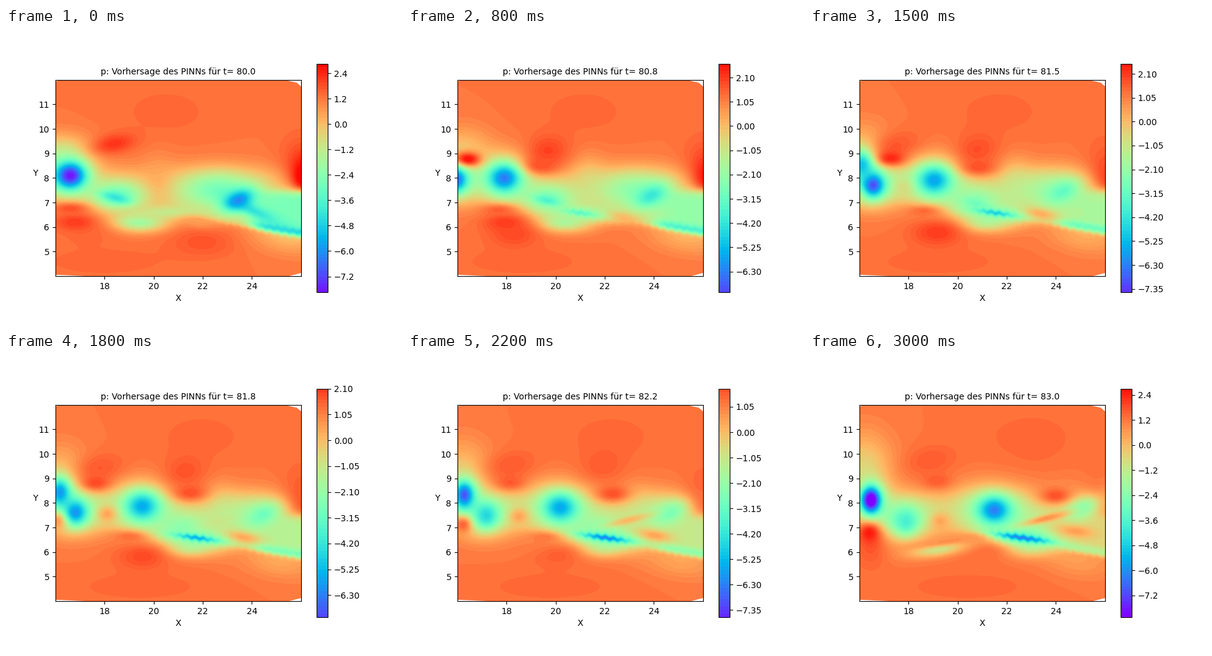
Animation, 640 px wide and 480 px high, one loop 3100 ms. Source, as a matplotlib script:

```python
import numpy as np
import matplotlib.pyplot as plt
from matplotlib.animation import FuncAnimation

FRAMES, INTERVAL = 31, 100
STEP = 0.15                       # spacing of the contour levels
VMIN, VMAX = -8.17, 2.93
XLIM, YLIM = (16.0005, 25.9995), (4.0005, 11.9995)
X, Y = np.meshgrid(np.linspace(*XLIM, 200), np.linspace(*YLIM, 160))

# Range of the prediction over time
KEY_U = [0, 0.8, 1.2, 1.8, 2.2, 2.6, 3]
KEY_LOW = [-7.95, -7.2, -7.65, -7.2, -7.65, -7.95, -8.25]
KEY_HIGH = [2.85, 2.7, 3.0, 2.1, 1.8, 1.8, 2.7]

# Corners outside the hull of the data
CORNERS = [
    [(16, 12), (16.2, 12), (16, 11.93)],
    [(25.3, 12), (25.83, 11.88), (26, 11.73), (26, 12)],
    [(16, 4), (16, 4.06), (17.3, 4)],
    [(25.5, 4), (26, 4.13), (26, 4)],
]


def sigmoid(s):
    return 0.5 * (1 + np.tanh(s / 2))


def rise(u, start, length=0.5):
    """Smooth ramp from 0 to 1."""
    s = np.clip((u - start) / length, 0, 1)
    return s * s * (3 - 2 * s)


def pulse(u, middle, width):
    return np.exp(-((u - middle) / width) ** 2)


class Pressure:
    """Pressure at time u: structures that drift with the flow."""

    def __init__(self, u):
        self.p = np.full(X.shape, 1.2)
        self.edge = 6.35 + 0.07 * u - 0.17 * (X - 21.8)
        self.edge += 0.02 * np.sin(2 * np.pi * X / 0.32) * sigmoid((X - 22) / 0.3)
        for part in (self.background, self.wake, self.halos, self.crests,
                     self.outflow, self.cores, self.streaks):
            part(u)

    def blend(self, weight, value):
        self.p += weight * (value - self.p)

    def spot(self, x, y, sx, sy, value, tilt=0, weight=1, ripple=0):
        """Pull the field towards a value inside a soft ellipse."""
        c, s = np.cos(np.radians(tilt)), np.sin(np.radians(tilt))
        dx = X - x
        dy = Y - y + ripple * np.sin(2 * np.pi * X / 0.33)
        q = ((dx * c + dy * s) / sx) ** 2 + ((dy * c - dx * s) / sy) ** 2
        self.blend(weight * np.exp(-q / 2), value)

    def background(self, u):
        self.spot(20.5 + 0.8 * u, 10.7, 1.5, 0.8, 1.42)
        self.spot(18 + 0.8 * u, 4.6, 2.0, 0.45, 1.45)
        self.spot(22 + 0.5 * u, 5.4, 1.0, 0.45, 1.75, weight=1 - rise(u, 0, 0.8))
        self.spot(16.2, 9.1 + 0.1 * u, 0.8, 0.5 + 0.17 * u,
                  -0.1 - 0.4 * np.cos(2 * np.pi * u / 3))
        self.spot(25.5 - 0.2 * u, 5.65, 1.1, 0.5, 0.2 * u, tilt=-8)

    def wake(self, u):
        soft = 0.06 + 0.16 * sigmoid((21 - X) / 0.3)
        inside = sigmoid((8.3 - Y) / 0.25) * sigmoid((Y - self.edge) / soft)
        self.blend(inside * sigmoid((X - 17) / 0.3), -0.3)
        # lighter gap between two vortices
        self.spot(20.2 + 1.4 * u, 7.8 - 0.2 * u, 0.5, 0.75,
                  0.5 - 1.2 * np.sin(np.pi * u / 3))

    def halos(self, u):
        self.spot(22.6 + 0.8 * u, 7.5, 1.1, 0.55, -2.8 + 0.6 * u)
        self.spot(18.5 + 1.5 * u, 7.25 - 0.13 * u, 0.75, 0.42, -3.3 + 0.55 * u)
        self.spot(19.4 + 1.15 * u, 6.2, 0.8, 0.28, -2 + 0.3 * u)
        self.spot(20.6 + 0.7 * u, 6.6, 1.0, 0.2, -1.2 - 0.5 * u)
        self.spot(16.6 + 1.63 * u, 8.1 - 0.13 * u, 0.7 + 0.1 * u, 0.65, -2.7, -5)
        self.spot(15.2 + 0.85 * u, 8.1 - 0.25 * u, 0.85, 0.6, -2.7)
        self.spot(15.75 + 0.24 * u, 8.8 - 0.24 * u, 0.5, 0.6, -2.8,
                  weight=rise(u, 1))

    def crests(self, u):
        """High pressure above, below and in front of the wake."""
        self.spot(18.4 + 1.6 * u, 9.4 - 0.65 * u + 0.33 * u ** 2, 0.6,
                  0.27 + 0.2 * rise(u, 0.2), 2.2 - 0.25 * u, tilt=10)
        self.spot(17.7 + 2.1 * u, 8.6 - 0.1 * u, 0.5, 0.25, 1.8,
                  weight=rise(u, 0.2))
        self.spot(16.2 + 0.9 * u, 9 + 0.25 * u, 0.7, 0.4, 1.65, tilt=10,
                  weight=rise(u, 0.8))
        self.spot(15.4 + 1.25 * u, 8.7 + 0.07 * u, 0.4, 0.22,
                  1.65 + 1.5 * pulse(u, 1, 0.6), weight=rise(u, 0.2))
        self.spot(17.3 + 1.25 * u, 5.6 + 0.12 * u, 0.75, 0.38,
                  1.35 + 0.8 * pulse(u, 1.3, 0.8))
        self.spot(16.8 + 1.4 * u, 6.2, 0.6, 0.25, 2.1, weight=1 - rise(u, 0.9))
        self.spot(16.6 + 1.35 * u, 6.75 - 0.07 * u, 0.5, 0.17, 1.8 - 0.25 * u)
        self.spot(15.8 + 0.22 * u, 6.2, 0.45, 0.6, 1.7, weight=rise(u, 2.3))
        self.spot(15.8 + 0.2 * u, 8.05 - 0.42 * u, 0.28, 0.28, -1.2 + 1.27 * u,
                  weight=rise(u, 1.3))

    def outflow(self, u):
        self.spot(26, 8.6, 0.6, 0.8, 1.9 - 0.2 * u)
        self.spot(26.1, 8.05, 0.3, 0.5, 3.3 - 0.9 * u)
        inside = sigmoid((7.45 - Y) / 0.1) * sigmoid((Y - self.edge) / 0.05)
        self.blend(inside * sigmoid((X - 24) / 0.3), -2.8 + 0.75 * u)
        rim = np.exp(-((Y - self.edge - 0.15) / 0.13) ** 2 / 2)
        self.blend(rim * sigmoid((X - 24.2) / 0.2), -4.6 + 1.05 * u)
        self.spot(24.2, 6.6, 0.8, 0.22, -4.2, tilt=-25,
                  weight=1 - rise(u, 0, 0.8))
        self.spot(21.8 + u, 6.2 + 0.22 * u, 0.5, 0.17, 0.6, tilt=-8)

    def cores(self, u):
        # oldest to youngest vortex
        self.spot(23.45 + 0.55 * u, 7.1 + 0.23 * u, 0.5, 0.3,
                  -2 - 4.2 * np.exp(-0.8 * u), tilt=25)
        self.spot(18.45 + 1.6 * u, 7.2 - 0.2 * u, 0.4, 0.13, -4.3 + 0.4 * u,
                  tilt=-15, weight=1 - rise(u, 1.3))
        self.spot(16.6 + 1.63 * u, 8.1 - 0.13 * u, 0.44, 0.38,
                  -8 + 2.5 * u - 0.65 * u ** 2)
        self.spot(15.2 + 0.9 * u, 8.2 - 0.32 * u, 0.33, 0.36,
                  -3.8 - 3.9 * pulse(u, 1.2, 0.8))
        self.spot(15.75 + 0.24 * u, 8.9 - 0.26 * u, 0.28, 0.38, -1 - 2.75 * u,
                  weight=rise(u, 0.9))
        self.spot(16.3 + u, 8 - 0.25 * u, 0.28, 0.25, 0.4, weight=rise(u, 1.3))

    def streaks(self, u):
        late = rise(u, 2.1, 0.8)
        self.spot(19.2, 6.1, 0.8, 0.2, -1, tilt=8, weight=late)
        self.spot(19.6, 6.45, 1.1, 0.1, 0.8, tilt=8, weight=late)
        self.spot(21.2 + 0.8 * u, 7.1 + 0.09 * u, 0.7, 0.1, 0.8, tilt=14,
                  weight=rise(u, 1.6, 1))
        x, y = 20.4 + 0.75 * u, 6.58
        grown = rise(u, 0.3)
        self.spot(x, y, 0.95, 0.2, -1.5 - 0.6 * u, -8, grown, 0.02)
        self.spot(x, y, 0.35 + 0.13 * u, 0.09, max(-1.8 - 2.1 * u, -6.5), -8,
                  grown, 0.03)


fig = plt.figure(figsize=(6.4, 4.8), dpi=100)


def draw(i):
    u = i / 10
    first = round(np.interp(u, KEY_U, KEY_LOW) / STEP)
    last = round(np.interp(u, KEY_U, KEY_HIGH) / STEP)
    levels = STEP * np.arange(first, last + 1)
    p = np.clip(Pressure(u).p, levels[0] + 1e-6, levels[-1] - 1e-6)

    fig.clear()
    ax = fig.add_subplot()
    filled = ax.contourf(X, Y, p, levels, cmap="rainbow", vmin=VMIN, vmax=VMAX)
    for corner in CORNERS:
        ax.fill(*zip(*corner), color="white", lw=0, zorder=1.5)
    ax.set(xlim=XLIM, ylim=YLIM, aspect="equal", xlabel="X")
    ax.set_ylabel("Y", rotation=0)
    ax.set_title(f"p: Vorhersage des PINNs für t= {80 + u:.1f}", fontsize=10)
    fig.colorbar(filled, ax=ax)


anim = FuncAnimation(fig, draw, frames=FRAMES, interval=INTERVAL,
                     init_func=lambda: None, repeat=True, repeat_delay=0)
plt.show()
```
